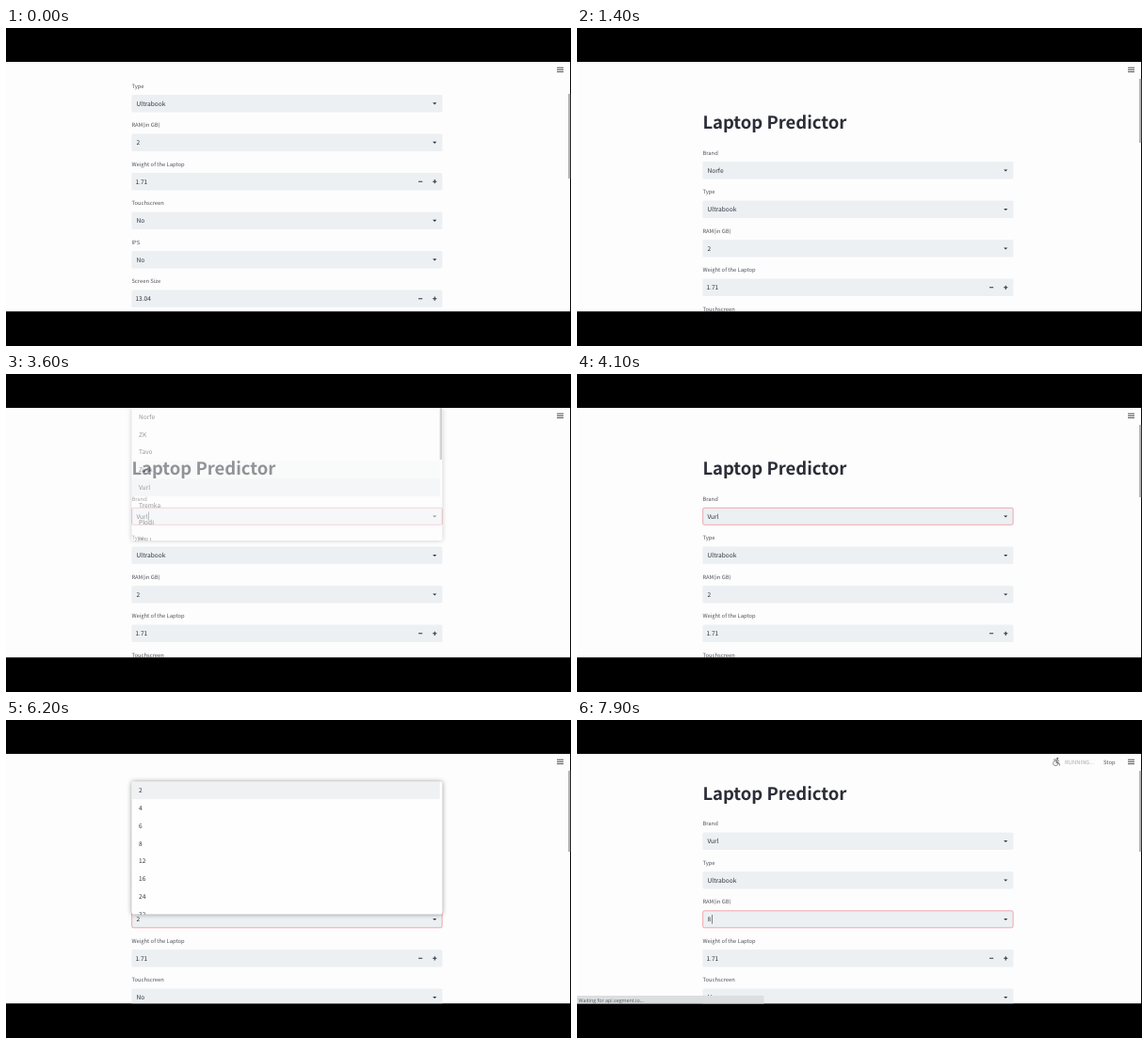
An HTML page for the animation above (8000 ms loop, 600x338 px).

```html
<!DOCTYPE html>
<html lang="en">
<head>
<meta charset="utf-8">
<title>Laptop Predictor</title>
<style>
  html, body { margin: 0; width: 100%; height: 100%; overflow: hidden; background: #000; }
  svg { display: block; }
  text {
    font-family: "Noto Sans CJK JP", "Noto Sans CJK SC", "Open Sans", sans-serif;
    text-rendering: geometricPrecision;
    white-space: pre;
  }
  .title { font-size: 18.48px; font-weight: 700; fill: #2b2d37; }
  .label { font-size: 5.82px; fill: #505259; }
  .value { font-size: 6.6px; fill: #31333f; }
  .number { font-kerning: none; }
  .busy { font-size: 5.86px; fill: #a9aaae; }
  .status { font-family: "Open Sans", sans-serif; font-size: 5.33px; fill: #55585b; }
  .menu { filter: drop-shadow(0 .5px 2.5px rgba(0, 0, 0, .42)); }
</style>
</head>
<body>
<svg id="stage" width="600" height="338" viewBox="0 0 600 338"></svg>
<script>
const LOOP = 8000, TICK = 100, BLINK = 530;
const TOP = 36, HEADER = 54, BOTTOM = 301.5, RIGHT = 599.2;
const LEFT = 133.4, WIDTH = 330, PITCH = 41.5, ROW = 18.78, MENU_H = 141;

const brands = ["Norfe", "ZK", "Tavo", "Zusk", "Vurl", "Tremka", "Plodi", "WRJ"];
const sizes = [2, 4, 6, 8, 12, 16, 24, 32];

// Moments of the recorded session, in ms
const OPEN_BRAND = 1600, PICK_BRAND = 3600, FOCUS_RAM = 5200, OPEN_RAM = 6200, PICK_RAM = 7700;

const ramp = (t, from, to) => Math.min(1, Math.max(0, (t - from) / (to - from)));
const within = (t, from, to) => t >= from && t < to;
const blink = (t, from, to) => within(t, from, to) && Math.floor((t - from) / BLINK) % 2 === 0;
const smooth = k => k * k * (3 - 2 * k);

function stateAt(t) {
  const away = 1 - smooth(ramp(t, 0, 300));
  const brandPicked = t >= PICK_BRAND, ramOpened = t >= OPEN_RAM, ramPicked = t >= PICK_RAM;
  const running = start => within(t, start, start + 400);
  return {
    scroll: 112.6 * away + (ramOpened ? 22.5 : 0),
    thumbY: HEADER + 16 * away,
    thumbH: 68 + 22 * away + 9 * (brandPicked + ramOpened),
    thumbShown: !within(t, OPEN_BRAND + 200, PICK_BRAND + 100),
    brand: brands[brandPicked ? 4 : 0],
    brandFocus: ramp(t, OPEN_BRAND, OPEN_BRAND + 200) * (1 - ramp(t, FOCUS_RAM - 100, FOCUS_RAM + 100)),
    brandCaret: blink(t, PICK_BRAND - 30, FOCUS_RAM),
    brandMenu: ramp(t, OPEN_BRAND, OPEN_BRAND + 300) * (1 - ramp(t, PICK_BRAND - 100, PICK_BRAND + 100)),
    brandHover: Math.round(4 * ramp(t, OPEN_BRAND, OPEN_BRAND + 300)),
    ram: sizes[ramPicked ? 3 : 0],
    ramFocus: ramp(t, FOCUS_RAM, FOCUS_RAM + 400) ** 2,
    ramCaret: blink(t, FOCUS_RAM + 100, 7000) || ramPicked,
    ramMenu: ramp(t, OPEN_RAM - 1, OPEN_RAM) * (1 - ramp(t, PICK_RAM - 100, PICK_RAM + 100)),
    ramHover: Math.floor(3 * ramp(t, OPEN_RAM, OPEN_RAM + 450)),
    busy: running(PICK_BRAND + 100) || running(PICK_RAM + 100),
    status: within(t, PICK_BRAND + 200, PICK_BRAND + 500) || t >= PICK_RAM + 200
  };
}

const rect = (x, y, w, h, fill, extra = "") =>
  `<rect x="${x}" y="${y}" width="${w}" height="${h}" fill="${fill}" ${extra}/>`;
const text = (x, y, cls, str) => `<text x="${x}" y="${y}" class="${cls}">${str}</text>`;
const path = (d, stroke, width) =>
  `<path d="${d}" fill="none" stroke="${stroke}" stroke-width="${width}"/>`;
const clip = (x, y, w, h, body) =>
  `<svg x="${x}" y="${y}" width="${w}" height="${h}" viewBox="${x} ${y} ${w} ${h}">${body}</svg>`;

function field(i, name, value, { number, focus, caretX } = {}) {
  const y = 142 + i * PITCH, mid = y + 9.3;
  let out = text(LEFT, y - 7.2, "label", name) + rect(LEFT, y, WIDTH, 18.6, "#ecf0f2", 'rx="1.6"');
  if (focus) {
    out += rect(LEFT + .3, y + .3, WIDTH - .6, 18, "none",
      `rx="1.6" stroke="#f0757c" stroke-width=".6" stroke-opacity="${focus}"`);
  }
  out += text(number ? 137.4 : 138.5, mid + 2.6, number ? "value number" : "value", value);
  if (caretX) out += rect(caretX, mid - 4.8, .6, 9.6, "#31333f");
  out += number
    ? path(`M438 ${mid}h4.2M453.2 ${mid}h4.2m-2.1-2.1v4.2`, "#31333f", 1.1)
    : `<path d="M453.1 ${mid - .9}h4.2l-2.1 2.2z" fill="#31333f"/>`;
  return out;
}

function page(s) {
  const fields = [
    ["Brand", s.brand, { focus: s.brandFocus, caretX: s.brandCaret && 151.4 }],
    ["Type", "Ultrabook"],
    ["RAM(in GB)", s.ram, { focus: s.ramFocus, caretX: s.ramCaret && 143.1 }],
    ["Weight of the Laptop", "1.71", { number: true }],
    ["Touchscreen", "No"],
    ["IPS", "No"],
    ["Screen Size", "13.04", { number: true }]
  ];
  return `<g transform="translate(0 ${-s.scroll})">` +
    text(LEFT, 107, "title", "Laptop Predictor") +
    fields.map((args, i) => field(i, ...args)).join("") + "</g>";
}

function menu(y, items, alpha, hover, { trail, bar } = {}) {
  if (!alpha) return "";
  const fillRow = (i, fill) => rect(LEFT, y + i * ROW, 327.3, ROW, fill);
  const rows = items.map((str, i) => text(141, y + 11.8 + i * ROW, "value", str)).join("");
  return `<g opacity="${alpha}">` +
    rect(LEFT, y, WIDTH, MENU_H, "#fefefe", 'class="menu" rx="1.6"') +
    clip(LEFT, y, WIDTH, MENU_H,
      (trail ? fillRow(hover - 1, "#f7f8f8") : "") + fillRow(hover, "#eff1f2") + rows +
      (bar ? rect(460.7, y, 2.4, 55, "#a6a6a6") : "")) +
    "</g>";
}

function busy() {
  const ink = "#74767b";
  return `<circle cx="510.3" cy="40.9" r="1.1" fill="${ink}"/>` +
    path("M509.8 42.6l-1 3h3l.8 2.9M506.2 42.2l3.4-.2 2.4 2", ink, 1) +
    `<circle cx="508.2" cy="46" r="2.6" fill="none" stroke="${ink}" stroke-width=".8"/>` +
    text(518, 46.6, "busy", "RUNNING...") + text(559, 46.6, "label", "Stop");
}

const statusBar = () => rect(-2, 293, 200.5, 12, "#dcdedf", 'rx="1"') +
  text(1.6, 299.9, "status", "Waiting for api.segment.io...");

function scene(s) {
  return clip(0, TOP, RIGHT, BOTTOM - TOP,
    rect(0, TOP, RIGHT, BOTTOM - TOP, "#fdfdfd") +
    clip(0, HEADER, RIGHT, BOTTOM - HEADER, page(s)) +
    path("M585 42.2h7M585 44.4h7M585 46.6h7", "#44464f", .95) +
    (s.busy ? busy() : "") +
    (s.thumbShown ? rect(597, s.thumbY, 3, s.thumbH, "#b4b4b4") : "") +
    menu(TOP, brands, s.brandMenu, s.brandHover, { trail: s.brandHover > 0, bar: true }) +
    menu(65.4, sizes, s.ramMenu, s.ramHover) +
    (s.status ? statusBar() : ""));
}

const stage = document.getElementById("stage");
const origin = performance.now();
let shown = -1;

function draw(now) {
  const step = Math.floor(Math.max(0, now - origin) % LOOP / TICK);
  if (step !== shown) {
    shown = step;
    stage.innerHTML = scene(stateAt(step * TICK));
  }
  requestAnimationFrame(draw);
}
draw(origin);
</script>
</body>
</html>
```
